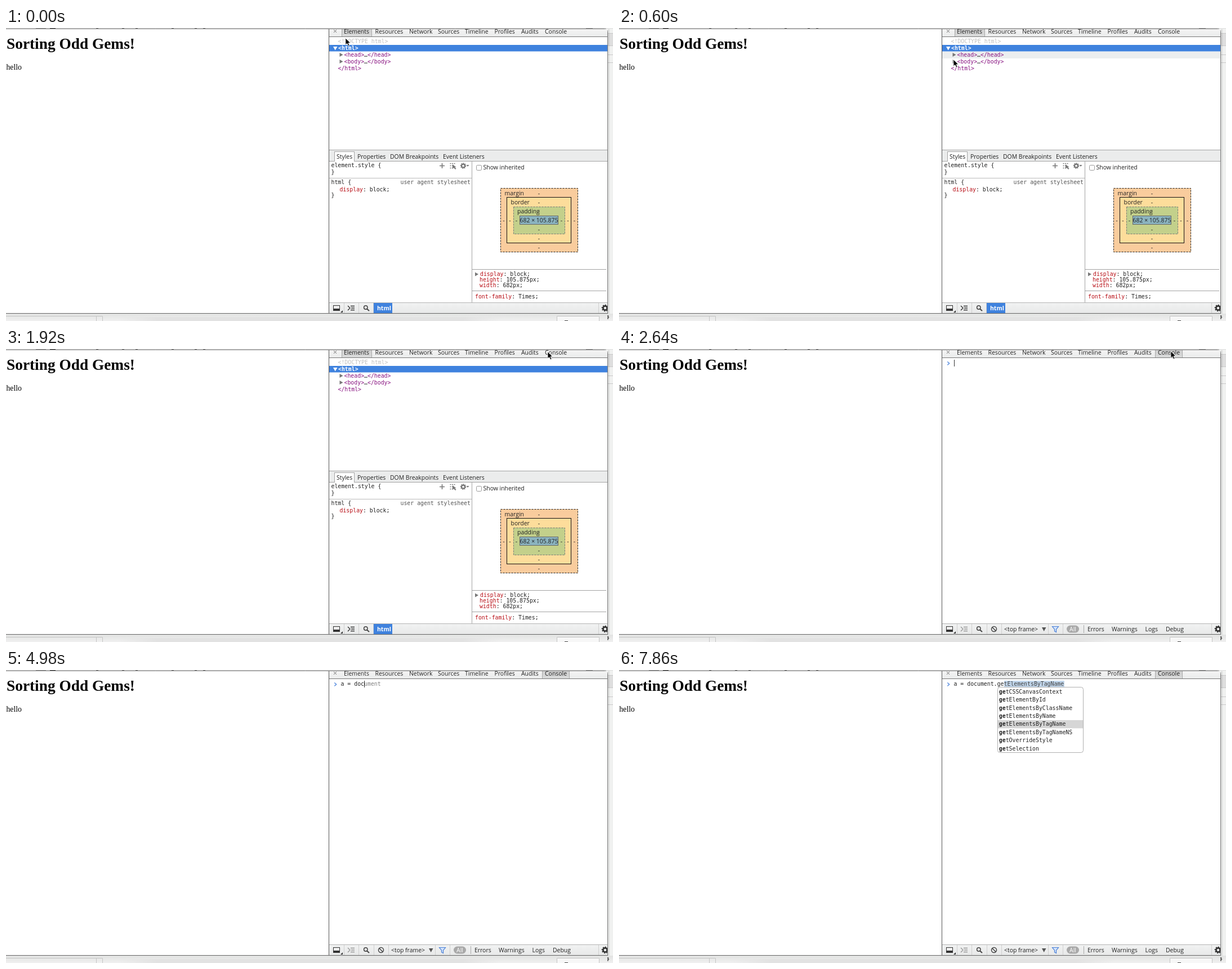
Write an HTML page with a canvas that moves like this. It is 1078 px wide and 520 px high and loops after 8000 ms.

```html
<!DOCTYPE html>
<html lang="en">
<head>
<meta charset="utf-8">
<title>Console autocomplete</title>
<style>
html, body { margin: 0; width: 100%; height: 100%; overflow: hidden; background: #fff; }
canvas { display: block; }
</style>
</head>
<body>
<canvas id="stage" width="1078" height="520"></canvas>
<script>
const ctx = document.getElementById('stage').getContext('2d');
const LOOP = 8000, STEP = 60;
const UI = '10.45px "Open Sans", "Noto Sans", sans-serif';
const MONO = '9.86px "DejaVu Sans Mono", monospace';
const SERIF = '"Liberation Serif", serif';
const CHAR = 5.936, PROMPT_X = 594.5;
const TAG = '#881280', RED = '#b80f16', BLUE = '#3f82de', LINE = '#a3a3a3';

// ---- drawing helpers
function rect(x, y, w, h, fill) {
  ctx.fillStyle = fill;
  ctx.fillRect(x, y, w, h);
}

function box(x, y, w, h, fill, stroke, dash = []) {
  rect(x, y, w, h, fill);
  ctx.strokeStyle = stroke;
  ctx.lineWidth = 1;
  ctx.setLineDash(dash);
  ctx.strokeRect(x + .5, y + .5, w - 1, h - 1);
  ctx.setLineDash([]);
}

function text(str, x, y, color = '#222', font = UI, align = 'left') {
  ctx.font = font;
  ctx.fillStyle = color;
  ctx.textAlign = align;
  ctx.fillText(str, x, y);
}

// Consecutive monospace pieces: [string, colour, bold]
function runs(x, y, pieces) {
  for (const [str, color, bold] of pieces) {
    text(str, x, y, color, (bold ? 'bold ' : '') + MONO);
    x += ctx.measureText(str).width;
  }
}

function shape(d, fill, stroke, width = 1) {
  const path = new Path2D(d);
  if (fill) { ctx.fillStyle = fill; ctx.fill(path); }
  if (stroke) { ctx.strokeStyle = stroke; ctx.lineWidth = width; ctx.stroke(path); }
}

function rounded(x, y, w, h, r, fill, stroke) {
  ctx.beginPath();
  ctx.roundRect(x, y, w, h, r);
  ctx.fillStyle = fill;
  ctx.fill();
  if (stroke) { ctx.strokeStyle = stroke; ctx.lineWidth = 1; ctx.stroke(); }
}

function ring(x, y, r, color, width) {
  ctx.beginPath();
  ctx.arc(x, y, r, 0, 7);
  ctx.strokeStyle = color;
  ctx.lineWidth = width;
  ctx.stroke();
}

function gear(x, y, r, color) {
  ring(x, y, r * .6, color, r * .45);
  ctx.setLineDash([r * .36, r * .32]);
  ring(x, y, r * .9, color, r * .3);
  ctx.setLineDash([]);
}

// Runs a drawing function limited to the columns from x to x + w
function clipped(x, w, paint) {
  ctx.save();
  ctx.beginPath();
  ctx.rect(x, 0, w, 520);
  ctx.clip();
  paint();
  ctx.restore();
}

function gradient(y0, y1, from, to) {
  const g = ctx.createLinearGradient(0, y0, 0, y1);
  g.addColorStop(0, from);
  g.addColorStop(1, to);
  return g;
}

const property = (x, y, name, value) => runs(x, y, [[name, RED], [`: ${value};`, '#222']]);

// ---- timeline
const pointerPath = [[120, 603, 18], [600, 594, 56], [720, 594, 58], [1380, 594, 58], [1500, 922, 2],
  [1920, 962, 5], [2100, 962, 5], [2640, 980, 4], [3000, 980, 4], [3480, 888, 100]];

const typing = [[4140, 'a'], [4260, 'a '], [4320, 'a ='], [4440, 'a = '], [4680, 'a = d'], [4800, 'a = do'],
  [4920, 'a = doc'], [5580, 'a = document'], [6000, 'a = document.'], [6300, 'a = document.g'],
  [6420, 'a = document.ge']];

const picks = [[0, 0], [7080, 1], [7200, 2], [7320, 3], [7440, 4], [7560, 5], [7740, 4]];

const caretOff = [[3000, 3480], [3960, 4140], [5520, 5580], [6900, 9000]];

const globals = ['debug', 'decodeURI', 'decodeURIComponent', 'default', 'defaultStatus', 'defaultstatus',
  'delete', 'devicePixelRatio', 'dir', 'dirxml', 'dispatchEvent', 'do', 'document'];
const getters = ['getCSSCanvasContext', 'getElementById', 'getElementsByClassName', 'getElementsByName',
  'getElementsByTagName', 'getElementsByTagNameNS', 'getOverrideStyle', 'getSelection'];

const within = (t, from, to) => t >= from && t < to;
const latest = (list, t, fallback) => list.reduce((v, [at, value]) => t >= at ? value : v, fallback);

function pointerAt(t) {
  const next = pointerPath.findIndex(([at]) => at > t);
  if (next === 0) return pointerPath[0].slice(1);
  if (next < 0) return pointerPath.at(-1).slice(1);
  const [t0, x0, y0] = pointerPath[next - 1], [t1, x1, y1] = pointerPath[next];
  const p = (t - t0) / (t1 - t0), k = p * p * (3 - 2 * p);
  return [x0 + (x1 - x0) * k, y0 + (y1 - y0) * k];
}

// ---- scene
function backdrop() {
  rect(0, 0, 1078, 520, '#f0f1f0');
  rect(0, 0, 1078, 1, '#e0e0e0');
  for (const x of [160, 206, 230, 294, 335, 350]) rect(x, 0, 4, 1, '#777');
  rect(53, 0, 18, 1, '#999');
  rect(78, 0, 10, 1, '#444');
  rect(1030, 0, 12, 1, '#999');
  rect(1069, 10, 9, 21, '#dedede');
  for (const y of [9, 31, 47, 61]) rect(1069, y, 9, 1, '#c9c9c9');
  rect(1069, 2, 3, 510, 'rgba(0,0,0,.07)');
  rect(0, 507, 1078, 13, gradient(507, 520, '#e2e3e2', '#f0f0f0'));
  const lump = ctx.createLinearGradient(200, 0, 880, 0);
  ['#e4e4e400', '#e2e2e2', '#e2e2e2', '#e4e4e400'].forEach((c, i) => lump.addColorStop([0, .1, .9, 1][i], c));
  rect(200, 513, 680, 7, lump);
  shape('M0 511.5H171.5V520M160.5 512V520', null, '#c4c4c4');
  shape('M978.5 520V511.5H1053.5V520', '#f7f7f7', '#c4c4c4');
  rect(992, 519, 6, 1, '#444');
  clipped(1068, 10, () => gear(1067, 513, 4, '#555'));
}

function page() {
  rounded(-10, 1.5, 1078.5, 505, [0, 5, 0, 0], '#fff', '#777');
  rect(0, 506, 1069, 1, '#666');
  text('Sorting Odd Gems!', 1, 36.5, '#000', 'bold 27.35px ' + SERIF);
  text('hello', .5, 74, '#000', '13.67px ' + SERIF);
}

function highlight(name, width, height) {
  const blue = 'rgba(111,168,220,.63)';
  if (name === 'body') {
    shape('M0 5H573V84H0V77H566V12H0Z', 'rgba(246,178,107,.66)');
    rect(0, 12, 566, 65, blue);
  } else {
    rect(0, 2, 573, 82, blue);
  }
  const right = (name.length + width.length + height.length + 8) * CHAR + .5;
  shape(`M-5 87.5H8L14 81.5L20 87.5H${right}q2 0 2 2V99.5q0 2-2 2H-5Z`, '#ffffc6', '#8a8a78');
  runs(-2, 98, [[name + ' ', TAG], [width, '#111'], ['px', '#888'], [' × ', '#333'],
    [height, '#111'], ['px', '#888']]);
}

function tabBar(selected) {
  rect(573, 2, 1, 504, '#555');
  rect(574, 2, 494, 13, gradient(2, 15, '#f3f3f3', '#ebecec'));
  rect(574, 15, 494, 1, '#777');
  const [x, w] = selected === 'Elements' ? [596, 54] : [952, 49];
  rect(x, 2, w, 13, gradient(2, 15, '#cfcfcf', '#d9dada'));
  rect(x, 2, 1, 13, '#aaa');
  rect(x + w - 1, 2, 1, 13, '#aaa');
  shape('M582 3L587 8M587 3L582 8', null, '#666');
  const tabs = { Elements: 600, Resources: 655.5, Network: 716, Sources: 767, Timeline: 815, Profiles: 867.5,
    Audits: 915, Console: 957 };
  for (const name in tabs) text(name, tabs[name], 9.5);
}

function elementTree(hovered) {
  if (hovered) rect(574, hovered === 'head' ? 42 : 54, 494, 12, '#eceeef');
  text('<!DOCTYPE html>', 589.5, 27, '#c0c0c0', MONO);
  rect(574, 30, 494, 11.5, BLUE);
  shape('M581 33H588.5L584.7 39.5Z', '#fff');
  text('<html>', 590, 39, '#fff', 'bold ' + MONO);
  [['head', 51], ['body', 63]].forEach(([tag, y]) => {
    shape(`M592.5 ${y - 7}V${y}L598.5 ${y - 3.5}Z`, '#777');
    runs(600.5, y, [[`<${tag}>`, TAG], ['…', '#222'], [`</${tag}>`, TAG]]);
  });
  text('</html>', 589.5, 75, TAG, MONO);
}

function stylesPane() {
  rect(574, 216, 494, 21, '#ebecec');
  rect(574, 216, 494, 1, LINE);
  rect(574, 236, 494, 1, LINE);
  box(583, 219, 36, 18, '#fff', LINE);
  rect(584, 236, 34, 1, '#fff');
  const tabs = { Styles: 587, Properties: 624, 'DOM Breakpoints': 682, 'Event Listeners': 776 };
  for (const name in tabs) text(name, tabs[name], 231.5);

  text('element.style {', 577.5, 247, '#222', MONO);
  text('}', 577.5, 259, '#222', MONO);
  shape('M774.5 240V249M770 244.5H779', null, '#777', 1.6);
  ctx.setLineDash([2, 1.5]);
  shape('M788.5 240.5H799M788.5 244.5H793M788.5 248.5H793', null, '#777', 1.3);
  ctx.setLineDash([]);
  shape('M793 242V250L795 248L798 251L799.5 249.5L797 247H799.5Z', '#777');
  gear(812, 244.5, 5, '#777');
  shape('M817.5 243H822.5L820 246Z', '#777');
  rect(574, 266, 253, 1, '#bbb');
  text('html {', 577.5, 276.5, '#222', MONO);
  text('user agent stylesheet', 700.5, 276.5, '#555', MONO);
  property(592.5, 289.5, 'display', 'block');
  text('}', 577.5, 300, '#222', MONO);
  rect(827, 237, 1, 250, LINE);
}

function boxModel() {
  rounded(835.5, 243.5, 9, 9, 2, '#fff', '#999');
  text('Show inherited', 847.5, 251);
  box(878, 284, 138, 114, '#f9cc9d', '#222', [3, 2]);
  box(889, 300, 115, 82, '#fddd9b', '#111');
  box(901, 317, 92, 49, '#c3d08b', '#777', [3, 2]);
  box(912, 333, 69, 16, '#8bb4c0', '#666');
  text('margin', 885.5, 296.5);
  text('border', 896.5, 312.5);
  text('padding', 908, 328.5);
  text('682 × 105.875', 946.5, 345, '#222', UI, 'center');
  for (const y of [296.5, 312.5, 328.5, 360.5, 376.5, 392.5]) text('-', 946.5, y, '#222', UI, 'center');
  for (const x of [884, 895, 906.5, 986.5, 998, 1009.5]) text('-', x, 344.5, '#222', UI, 'center');
  rect(828, 428, 238, 1, LINE);
  shape('M833 433.5V440.5L839 437Z', '#777');
  property(842, 440, 'display', 'block');
  property(841, 450, 'height', '105.875px');
  property(841, 460, 'width', '682px');
  rect(828, 466, 238, 1, LINE);
  property(833, 480, 'font-family', 'Times');
}

function statusBar(inConsole) {
  rect(574, 487, 494, 19, gradient(487, 506, '#f1f2f2', '#e8e9e9'));
  rect(574, 487, 494, 1, '#b4b4b4');
  const separators = inConsole ? [600, 626, 653, 679, 762, 788, 1052] : [600, 626, 652, 1052];
  for (const x of separators) rect(x, 488, 1, 18, '#cfcfcf');
  box(581, 492, 12, 10, '#eee', '#333');
  rect(581, 498, 12, 4, '#333');
  shape('M598 501V505H594Z', '#333');
  const drawer = inConsole ? '#999' : '#333';
  shape('M607 493L611 497L607 501M612 493.5H619M613 497H619M612 500.5H619', null, drawer, 1.4);
  ring(638.8, 496, 3.2, '#444', 1.5);
  shape('M641 498.5L645 502', null, '#444', 2);
  clipped(574, 494, () => gear(1064, 497, 6, '#333'));
  rect(1068, 487, 1, 19, '#777');
  if (!inConsole) {
    rect(653, 488, 33, 18, BLUE);
    text('html', 659, 501, '#fff', 'bold ' + UI);
    return;
  }
  ring(666, 497, 4.5, '#444', 1.5);
  shape('M663 494L669 500', null, '#444', 1.5);
  text('<top frame>', 684, 501);
  shape('M751 494H758.5L754.7 501Z', '#555');
  shape('M769.5 492.5H780.5L776.5 497.5V502.5L773.5 501V497.5Z', '#d5e4fa', '#4a80d8', 1.2);
  rounded(795, 490.5, 22, 13, 6.5, '#a9a9a9');
  text('All', 806, 501, '#fff', UI, 'center');
  rect(825, 490, 1, 14, '#aaa');
  const filters = { Errors: 832, Warnings: 875, Logs: 934.5, Debug: 971 };
  for (const name in filters) text(name, filters[name], 501);
}

function suggestions(items, prefix, start, picked) {
  const row = 14.43, x = Math.round(PROMPT_X + start * CHAR) + .5, y = 30.5;
  const width = Math.round(Math.max(...items.map(s => s.length)) * CHAR + 21);
  rounded(x, y, width, Math.round(items.length * row) + 1, 4, '#fff', '#b0b0b0');
  rect(x + .5, y + .8 + picked * row, width - 1, row, '#d6d6d6');
  items.forEach((item, i) => runs(x + 2.3, y + 11.2 + i * row,
    [[prefix, '#222', true], [item.slice(prefix.length), '#222']]));
}

function consolePane(t) {
  const typed = latest(typing, t, '');
  const word = typed.match(/\w*$/)[0];
  const start = typed.length - word.length;
  const caretX = PROMPT_X + typed.length * CHAR;
  const candidates = start === 13 ? getters : globals;
  const matches = start >= 4 && word ? candidates.filter(s => s.startsWith(word)) : [];
  const picked = latest(picks, t, 0);
  const browsing = t >= 7080;

  shape('M583.3 22.5L586.6 25.5L583.3 28.5', null, '#5b8fe0', 1.5);
  text(typed, PROMPT_X, 28, '#222', MONO);
  if (matches.length) {
    const ghost = matches[picked].slice(word.length);
    if (browsing) rect(Math.round(caretX), 19, ghost.length * CHAR, 12, '#c0d5ea');
    text(ghost, caretX, 28, browsing ? '#444' : '#808080', MONO);
  }
  if (!caretOff.some(([from, to]) => within(t, from, to))) rect(Math.round(caretX), 19, 1, 12, '#333');
  if (matches.length > 1) suggestions(matches, word, start, picked);
}

function pointer(t) {
  if (t >= 4140) return;
  const [x, y] = pointerAt(t);
  ctx.save();
  ctx.translate(x, y);
  if (t >= 3300) shape('M-3 -8Q0 -8 0 -6Q0 -8 3 -8M0 -6V6M-3 8Q0 8 0 6Q0 8 3 8', null, '#333');
  else shape('M0 0V12L2.8 9.4L5 14L7 13L5 8.7H8.8Z', '#000', '#fff', .8);
  ctx.restore();
}

function draw(t) {
  const inConsole = t >= 2340;
  backdrop();
  page();
  if (within(t, 300, 420)) highlight('html', '682', '105.875');
  if (within(t, 660, 1620)) highlight('body', '666', '77');
  rect(574, 2, 494, 504, '#fff');
  tabBar(inConsole ? 'Console' : 'Elements');
  if (inConsole) {
    consolePane(t);
  } else {
    const onBody = within(t, 660, 1440);
    const onHead = within(t, 480, 660) || within(t, 1440, 1620);
    elementTree(onBody ? 'body' : onHead ? 'head' : '');
    stylesPane();
    boxModel();
  }
  statusBar(inConsole);
  pointer(t);
}

const begin = performance.now();
function tick() {
  const t = (performance.now() - begin) % LOOP;
  draw(Math.floor(t / STEP) * STEP);
  requestAnimationFrame(tick);
}
tick();
</script>
</body>
</html>
```
